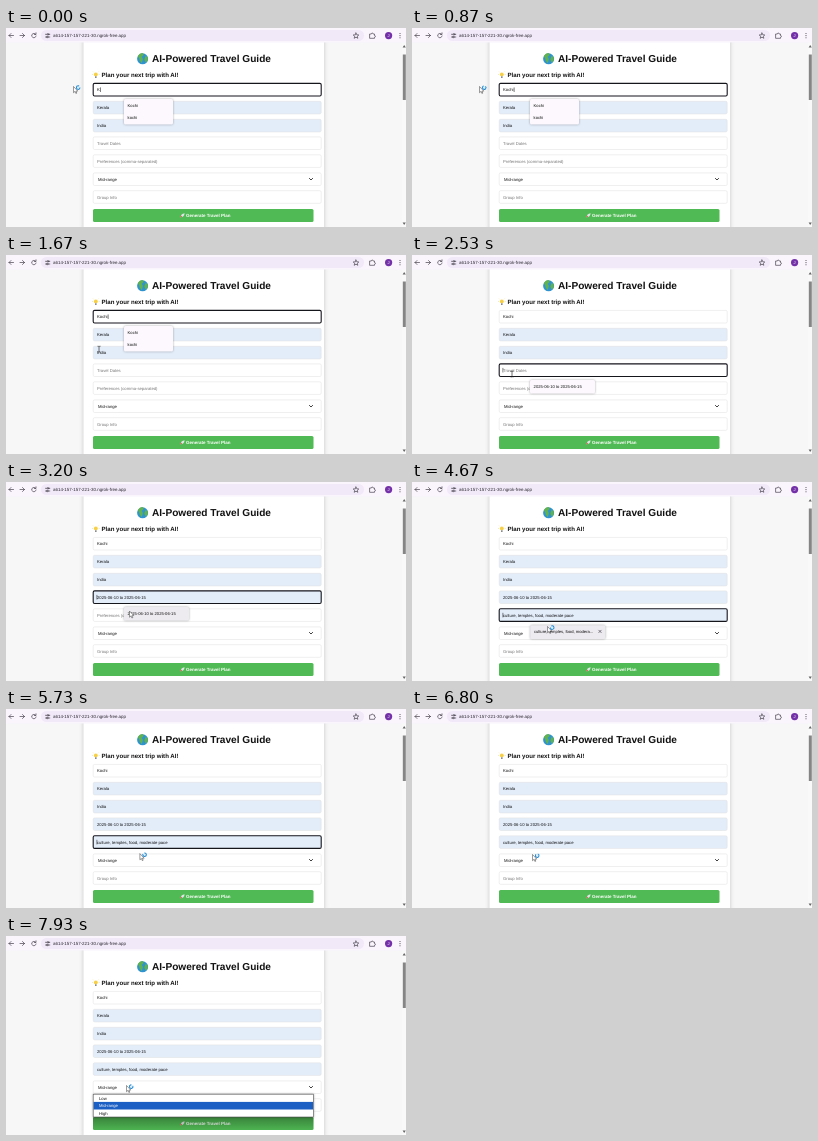
An HTML page that plays this animation: 400x199 px, repeating every 8 s.

```html
<!DOCTYPE html>
<html lang="en">
<head>
<meta charset="utf-8">
<title>Travel form</title>
<style>
  html, body { margin: 0; width: 100%; height: 100%; overflow: hidden; background: #f7f7f7; }
  svg { display: block; width: 100vw; height: 100vh; }
  text { font: 4.22px "Liberation Sans", Arial, sans-serif; fill: #111; text-rendering: geometricPrecision; white-space: pre; }
  .bold { font-weight: bold; }
  .mid { text-anchor: middle; }
  .line { fill: none; stroke: #4a4450; stroke-width: .7; stroke-linecap: round; stroke-linejoin: round; }
  .soft { filter: drop-shadow(0 .5px 1.2px #0005); }
</style>
</head>
<body>
<svg viewBox="0 0 400 199" preserveAspectRatio="none">
  <defs>
    <linearGradient id="shade" x2="0" y2="1">
      <stop stop-color="#000" stop-opacity=".3"/>
      <stop offset="1" stop-color="#000" stop-opacity=".04"/>
    </linearGradient>
  </defs>
  <rect width="400" height="199" fill="#f7f7f7"/>
  <rect x="77.5" y="-8" width="240.5" height="220" fill="#fff" style="filter:drop-shadow(0 0 2px #0003)"/>

  <g id="browser">
    <rect width="400" height="14.5" fill="#faf4fd"/>
    <rect x="35" y="2" width="323" height="11" rx="5.5" fill="#f1e9f8"/>
    <path class="line" d="M7.5 7.5H3M5 5.5L3 7.5L5 9.5M14 7.5h4.5M16.5 5.5l2 2l-2 2"/>
    <path class="line" d="M29.6 6.1A2.2 2.2 0 1 0 30.1 8M30 4.8V6.5H28.3"/>
    <path class="line" d="M39.5 6.3h1.6M43 6.3h.8M39.5 9h.8M42.2 9h1.6"/>
    <circle class="line" cx="42" cy="6.3" r=".8"/><circle class="line" cx="41.2" cy="9" r=".8"/>
    <text x="47" y="9" style="font-size:4.44px;fill:#2b2730">a614-157-157-221-30.ngrok-free.app</text>
    <path class="line" d="M350 5l.8 1.8l2 .2l-1.5 1.3l.5 2l-1.8-1.1l-1.8 1.1l.5-2l-1.5-1.3l2-.2z"/>
    <path class="line" d="M364 6h1.4a.9.9 0 0 1 1.8 0h1.3v1.5a.9.9 0 0 1 0 1.8v1h-4.5z"/>
    <circle cx="382.6" cy="7.6" r="3.6" fill="#7430a8"/>
    <text class="mid" x="382.6" y="9.1" style="fill:#fff">J</text>
    <g fill="#4a4450"><circle cx="394" cy="5.5" r=".55"/><circle cx="394" cy="7.6" r=".55"/><circle cx="394" cy="9.7" r=".55"/></g>
    <rect x="395.8" y="14.5" width="4.2" height="185" fill="#f9f9f9"/>
    <rect x="396.8" y="26.5" width="3" height="45.5" fill="#858585"/>
    <path d="M396.6 19.5l1.6-2.4l1.6 2.4zM396.6 194.5l1.6 2.4l1.6-2.4z" fill="#666"/>
  </g>

  <g id="heading">
    <circle cx="136.6" cy="30.8" r="5.5" fill="#2f93d0"/>
    <path d="M132 28q2-3.5 5-2.8l.6 2l-2 1.5l1.2 2l-1 4.5l-2-2.5l-.6-2.4zM139.5 28l2.2 1l-.2 4l-1.8 1.6l-1.4-3z" fill="#63b34a"/>
    <text class="bold" x="146" y="34.4" style="font-size:10.1px">AI-Powered Travel Guide</text>
    <circle cx="89.8" cy="46.4" r="1.9" fill="#f6cf45"/>
    <path d="M89 48.2h1.6v1.8H89z" fill="#8b8b8b"/>
    <path d="M86.8 46.4h-.8M92.8 46.4h.8M87.6 44.2l-.5-.5M92 44.2l.5-.5" stroke="#f0c030" stroke-width=".5"/>
    <text class="bold" x="95.5" y="49.3" style="font-size:6.1px">Plan your next trip with AI!</text>
  </g>

  <g id="fields"></g>
  <path class="line" d="M303.4 150.4l1.6 1.6l1.6-1.6" style="stroke:#111;stroke-width:.8"/>

  <g id="button">
    <rect x="87" y="181" width="220.5" height="13" rx="1.5" fill="#50ba54"/>
    <path d="M174.2 189.4l1.2-2.6q1.4-1.6 3.2-1.6q0 1.8-1.5 3.2z" fill="#e4e4ea"/>
    <path d="M174.2 189.4l.7-1.9l1.2 1.2z" fill="#d2493c"/>
    <text class="bold" x="180" y="189.2" style="font-size:4.5px;fill:#fff">Generate Travel Plan</text>
  </g>

  <g id="popups"></g>

  <g id="options">
    <rect x="87" y="181" width="220.5" height="13" fill="url(#shade)"/>
    <rect class="soft" x="87.2" y="158.2" width="220.2" height="22.8" fill="#fff" stroke="#555" stroke-width=".6"/>
    <rect x="87.6" y="165.9" width="219.4" height="7.6" fill="#1c5fc4"/>
    <text x="93" y="163.5">Low</text>
    <text x="93" y="171.2" style="fill:#fff">Mid-range</text>
    <text x="93" y="178.8">High</text>
  </g>

  <g id="cursor">
    <path id="arrow" d="M-1.5 -2.5v6.2l1.5-1.3l.9 2.1l.9-.4l-.9-2h1.9z" fill="#fff" stroke="#222" stroke-width=".45"/>
    <circle id="ring" cx="3.2" cy="-1.4" r="1.8" fill="#d9f0ff" stroke="#2489d0" stroke-width="1" stroke-dasharray="8.5 2.8"/>
    <path id="beam" d="M-1.5 -2.8h1.1l.4.4l.4-.4h1.1M0 -2.4v4.9M-1.5 2.9h1.1l.4-.4l.4.4h1.1" fill="none" stroke="#222" stroke-width=".65"/>
  </g>
</svg>
<script>
const LOOP = 8000;
const DATES = '2025-06-10 to 2025-06-15';
const TASTES = 'culture, temples, food, moderate pace';
const ROWS = [
  { y: 61.7, hint: 'City' },
  { y: 79.6, hint: 'Kerala', filled: true },
  { y: 97.6, hint: 'India', filled: true },
  { y: 115.2, hint: 'Travel Dates' },
  { y: 133.1, hint: 'Preferences (comma-separated)' },
  { y: 151.2, hint: 'Mid-range', select: true },
  { y: 169, hint: 'Group Info' }
];

// time, x, y of the pointer
const PATH = [
  [0, 69, 61], [1130, 69, 61], [1400, 80, 76], [1670, 93, 94], [2000, 99, 114],
  [2300, 100, 119], [2600, 100, 119], [2950, 124, 131], [3450, 126, 132], [4070, 125, 133.5],
  [4250, 126, 134], [4600, 137, 147], [5650, 137, 147], [6400, 122, 148], [7400, 122, 148],
  [7700, 122, 152], [8000, 122, 152]
];
const TYPED = [[0, 'K'], [200, 'Ko'], [400, 'Koc'], [600, 'Koch'], [800, 'Kochi']];
const FOCUS = [[0, 0], [2060, 3], [4130, 4], [6600, -1]];
const POINTER = [[0, 'busy'], [1330, 'beam'], [2750, 'arrow'], [3500, 'beam'], [4400, 'busy']];

const byId = id => document.getElementById(id);
const at = (table, t) => table.filter(step => step[0] <= t).pop()[1];
const show = (node, on) => node.setAttribute('visibility', on ? 'visible' : 'hidden');

function add(parent, tag, attrs, label = '') {
  const node = document.createElementNS('http://www.w3.org/2000/svg', tag);
  for (const key in attrs) node.setAttribute(key, attrs[key]);
  node.textContent = label;
  parent.append(node);
  return node;
}

const fields = ROWS.map(row => ({
  box: add(byId('fields'), 'rect', { x: 87.2, y: row.y - 6.3, width: 228, height: 12.6, rx: 1.4 }),
  text: add(byId('fields'), 'text', { x: row.select ? 92 : 91, y: row.y + 1.5 }, row.hint),
  caret: add(byId('fields'), 'rect', { y: row.y - 2.3, width: .5, height: 4.6 })
}));

function popup(x, y, w, h, lines) {
  const group = add(byId('popups'), 'g', {});
  const box = add(group, 'rect', { class: 'soft', x, y, width: w, height: h, rx: 1.5, fill: '#fcf8fd' });
  lines.forEach((line, i) => add(group, 'text', { x: x + 3.6, y: y + 8 + i * 11.7, style: 'font-size:4.15px' }, line));
  return { group, box };
}
const cities = popup(118, 71, 49, 25.5, ['Kochi', 'kochi']);
const dates = popup(118, 125, 65, 13.5, [DATES]);
const tastes = popup(118.3, 143.2, 75, 13.8, ['culture, temples, food, modera...']);
const cross = add(tastes.group, 'path', { class: 'line', d: 'M186.8 148.2l2.4 2.4m0 -2.4l-2.4 2.4' });

function setField(i, value, filled, focused) {
  const { box, text, caret } = fields[i];
  const { hint, select } = ROWS[i];
  const label = value || hint;
  if (text.textContent !== label) text.textContent = label;
  text.style.fill = value || select ? '#111' : '#777';
  box.setAttribute('fill', filled ? '#e3edfa' : '#fff');
  box.setAttribute('stroke', focused ? '#15151c' : '#dedede');
  box.setAttribute('stroke-width', focused ? 1.1 : .5);
  show(caret, focused);
  caret.setAttribute('x', i === 0 ? 91.3 + text.getComputedTextLength() : 90.7);
}

function pointerAt(t) {
  const i = PATH.findIndex(step => step[0] > t);
  const [t0, x0, y0] = PATH[i - 1], [t1, x1, y1] = PATH[i];
  const k = (t - t0) / (t1 - t0);
  return [x0 + (x1 - x0) * k, y0 + (y1 - y0) * k];
}

function draw(now) {
  const t = now % LOOP;
  const focus = at(FOCUS, t);
  const hasDates = t >= 2870, hasTastes = t >= 4500;
  const values = [at(TYPED, t), 'Kerala', 'India', hasDates && DATES, hasTastes && TASTES];
  const filled = [false, true, true, hasDates, hasTastes];
  ROWS.forEach((row, i) => setField(i, values[i], filled[i], focus === i));

  show(cities.group, t < 2060);
  show(dates.group, t >= 2200 && t < 3450);
  show(tastes.group, t >= 4200 && t < 5000);
  show(cross, t >= 4500 && t < 5000);
  dates.box.setAttribute('fill', hasDates ? '#eeebf0' : '#fcf8fd');
  tastes.box.setAttribute('fill', hasTastes ? '#eeebf0' : '#fcf8fd');
  show(byId('options'), t >= 7470);

  const kind = at(POINTER, t);
  show(byId('arrow'), kind !== 'beam');
  show(byId('ring'), kind === 'busy');
  show(byId('beam'), kind === 'beam');
  byId('cursor').setAttribute('transform', `translate(${pointerAt(t)})`);
  byId('ring').setAttribute('transform', `rotate(${t * .36} 3.2 -1.4)`);
}

const start = performance.now();
function tick() {
  draw(performance.now() - start);
  requestAnimationFrame(tick);
}
tick();
</script>
</body>
</html>
```
